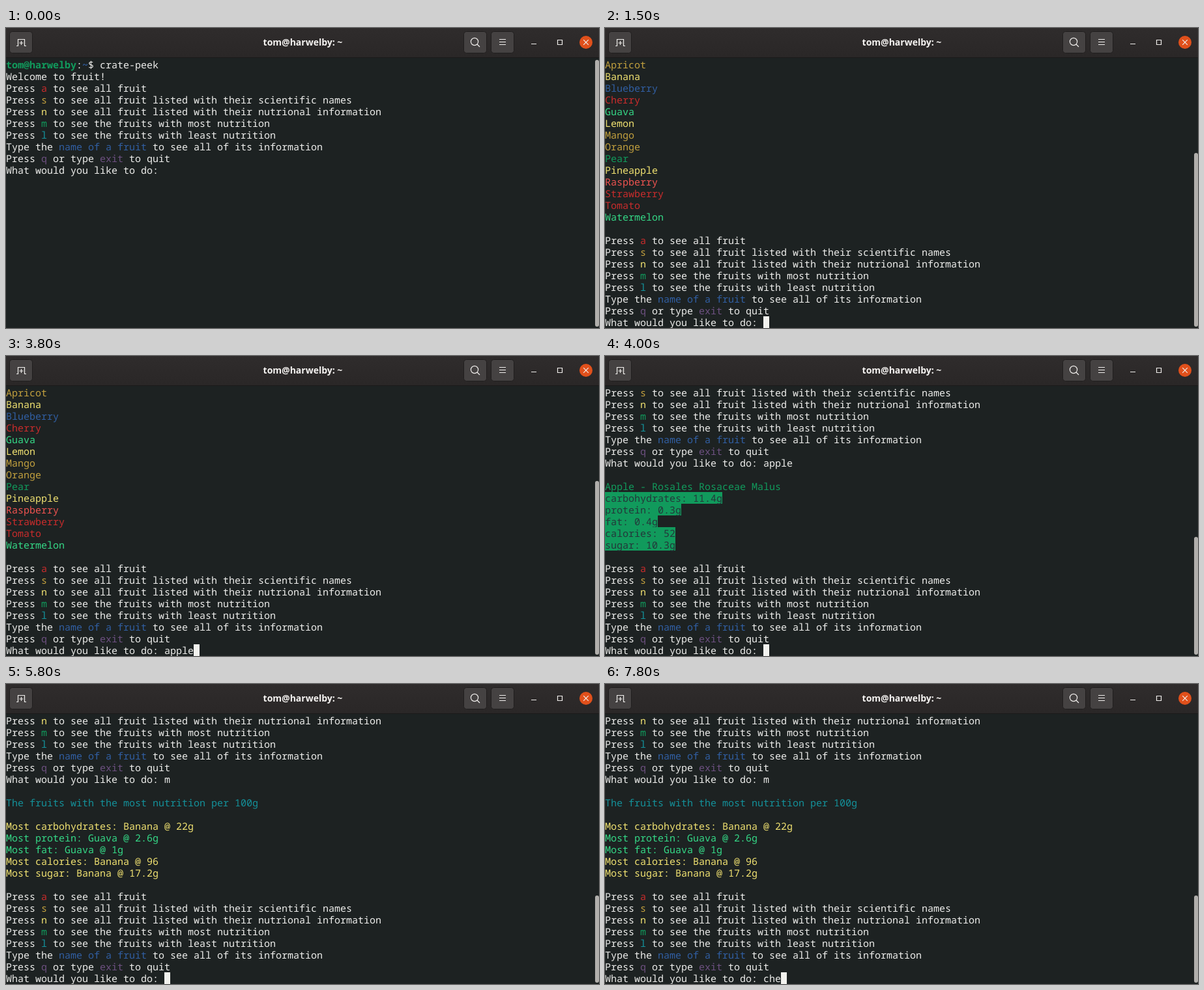
Animation of 910x461 px, one loop 8 s. Source, as an HTML page:

```html
<!DOCTYPE html>
<html lang="en">
<head>
<meta charset="utf-8">
<title>Terminal</title>
<style>
  html, body { margin: 0; width: 100%; height: 100%; overflow: hidden; background: #1d2222; }
  svg { display: block; width: 910px; height: 461px; }
  .term text { font: 15px "Noto Sans Mono", "DejaVu Sans Mono", monospace; white-space: pre; text-rendering: geometricPrecision; }
  .term .bold { font-weight: 700; }
  .title { font: 700 14px "Open Sans", "Noto Sans", sans-serif; fill: #f5f3f1; text-anchor: middle; }
  .button { fill: #454242; stroke: #201e1e; }
  .icon { fill: none; stroke: #f0eeec; stroke-width: 1.2; }
</style>
</head>
<body>
<svg viewBox="0 0 910 461">
  <defs>
    <linearGradient id="bar" x2="0" y2="1">
      <stop offset="0" stop-color="#2f2c2c"/>
      <stop offset="1" stop-color="#2a2727"/>
    </linearGradient>
  </defs>
  <rect width="910" height="461" fill="#1d2222"/>
  <g class="term">
    <g id="lines"></g>
    <text id="typed" x="243" fill="#eeeeec"></text>
    <rect id="cursor" width="9" height="18" fill="#f2f2ee"/>
  </g>
  <rect id="thumb" x="904" width="6" rx="3" fill="#b1afac"/>

  <rect width="910" height="45" fill="url(#bar)"/>
  <rect y="45" width="910" height="1" fill="#1b1919"/>
  <text class="title" x="455.5" y="27">tom@harwelby: ~</text>
  <g class="button">
    <rect x="5.5" y="5.5" width="35" height="33" rx="4"/>
    <rect x="702.5" y="5.5" width="35" height="33" rx="4"/>
    <rect x="744.5" y="5.5" width="35" height="33" rx="4"/>
  </g>
  <circle cx="890" cy="22" r="10" fill="#e0501b"/>
  <g class="icon">
    <path d="M16 27.5H18.5V17.5H28.5V27.5H31M23.5 20V26M20.5 23H26.5"/>
    <circle cx="719" cy="21" r="5.6"/>
    <path d="M723 25L727 29M757 17.5H767M757 21.5H767M757 25.5H767"/>
    <path d="M806 24.5H814M846.5 18.5H853.5V25.5H846.5Z"/>
    <path d="M886.2 18.2L893.8 25.8M893.8 18.2L886.2 25.8"/>
  </g>
</svg>
<script>
const LOOP = 8000, ROWS = 23, CELL = 9, LINE = 18, TOP = 47, BASE = 15;
const COLORS = {
  w: "#eeeeec", r: "#c92c2c", R: "#ef5350", o: "#c2a03e", y: "#f1e271",
  g: "#119a5c", G: "#35d987", b: "#315fa3", c: "#14919a", p: "#6d5080", k: "#24373a"
};

// "{r:text}" colours a run; "*" makes it bold, "#" puts it on a green band.
const ASK = "What would you like to do: ";
const MENU = [
  "Press {r:a} to see all fruit",
  "Press {o:s} to see all fruit listed with their scientific names",
  "Press {y:n} to see all fruit listed with their nutrional information",
  "Press {g:m} to see the fruits with most nutrition",
  "Press {c:l} to see the fruits with least nutrition",
  "Type the {b:name of a fruit} to see all of its information",
  "Press {p:q} or type {p:exit} to quit"
];
const paint = (style, rows) => rows.map(row => `{${style}:${row}}`);

const welcome = ["{g*:tom@harwelby}:{b*:~}$ crate-peek", "Welcome to fruit!", ...MENU, ASK];
const fruits = [
  "{o:Apricot}", "{y:Banana}", "{b:Blueberry}", "{r:Cherry}", "{G:Guava}", "{y:Lemon}",
  "{o:Mango}", "{o:Orange}", "{g:Pear}", "{y:Pineapple}", "{R:Raspberry}",
  "{r:Strawberry}", "{r:Tomato}", "{G:Watermelon}"
];
const apple = ["", "{g:Apple - Rosales Rosaceae Malus}", ...paint("k#", [
  "carbohydrates: 11.4g", "protein: 0.3g", "fat: 0.4g", "calories: 52", "sugar: 10.3g"
])];
const most = ["", "{c:The fruits with the most nutrition per 100g}", "",
  "{y:Most carbohydrates: Banana @ 22g}", "{G:Most protein: Guava @ 2.6g}",
  "{G:Most fat: Guava @ 1g}", "{y:Most calories: Banana @ 96}", "{y:Most sugar: Banana @ 17.2g}"];

// Each answer extends the scrollback; the window shows its tail.
const screens = [welcome];
for (const [answer, output] of [["a", fruits], ["apple", apple], ["m", most]]) {
  const before = screens.at(-1);
  screens.push([...before.slice(0, -1), ASK + answer, ...output, "", ...MENU, ASK]);
}

// time, screen, typed text, cursor shown, scrollbar top
const STEPS = [
  [0, 0, "", 0, 49], [300, 0, "", 1, 49], [800, 0, "", 0, 49],
  [1300, 0, "a", 1, 49], [1400, 0, "a", 1, 192],
  [1500, 1, "", 1, 192], [2000, 1, "", 0, 192], [2600, 1, "", 1, 192], [3200, 1, "", 0, 192],
  [3300, 1, "a", 1, 192], [3400, 1, "ap", 1, 192], [3500, 1, "app", 1, 192],
  [3700, 1, "appl", 1, 192], [3800, 1, "apple", 1, 192],
  [4000, 2, "", 1, 278], [4500, 2, "", 0, 278], [5100, 2, "", 1, 278], [5600, 2, "m", 1, 278],
  [5800, 3, "", 1, 325], [6400, 3, "", 0, 325], [7100, 3, "", 1, 325],
  [7500, 3, "ch", 1, 325], [7800, 3, "che", 1, 325]
];

const byId = id => document.getElementById(id);
const [lines, typed, cursor, thumb] = ["lines", "typed", "cursor", "thumb"].map(byId);

function add(tag, attrs, text = "") {
  const node = document.createElementNS("http://www.w3.org/2000/svg", tag);
  for (const name in attrs) node.setAttribute(name, attrs[name]);
  node.textContent = text;
  lines.append(node);
}

function drawLine(source, row) {
  const y = TOP + row * LINE;
  let col = 0;
  for (const [, style = "w", marked, plain] of source.matchAll(/\{(\w[*#]?):([^}]*)\}|([^{]+)/g)) {
    const text = marked ?? plain, x = col * CELL;
    if (style[1] === "#") add("rect", { x, y, width: text.length * CELL, height: LINE, fill: COLORS.g });
    add("text", { x, y: y + BASE, fill: COLORS[style[0]], class: style[1] === "*" ? "bold" : "" }, text);
    col += text.length;
  }
}

let shown = null;
function render(time) {
  const step = STEPS.findLast(([start]) => start <= time % LOOP);
  if (step === shown) return;
  const [, screen, text, blink, top] = step;
  const rows = screens[screen].slice(-ROWS);
  if (!shown || shown[1] !== screen) {
    lines.replaceChildren();
    rows.forEach(drawLine);
  }
  const y = TOP + (rows.length - 1) * LINE;
  typed.textContent = text;
  typed.setAttribute("y", y + BASE);
  cursor.setAttribute("x", (ASK.length + text.length) * CELL);
  cursor.setAttribute("y", y);
  cursor.setAttribute("visibility", blink ? "visible" : "hidden");
  thumb.setAttribute("y", top);
  thumb.setAttribute("height", 459 - top);
  shown = step;
}

const start = performance.now();
function tick() {
  render(performance.now() - start);
  requestAnimationFrame(tick);
}
tick();
</script>
</body>
</html>
```
